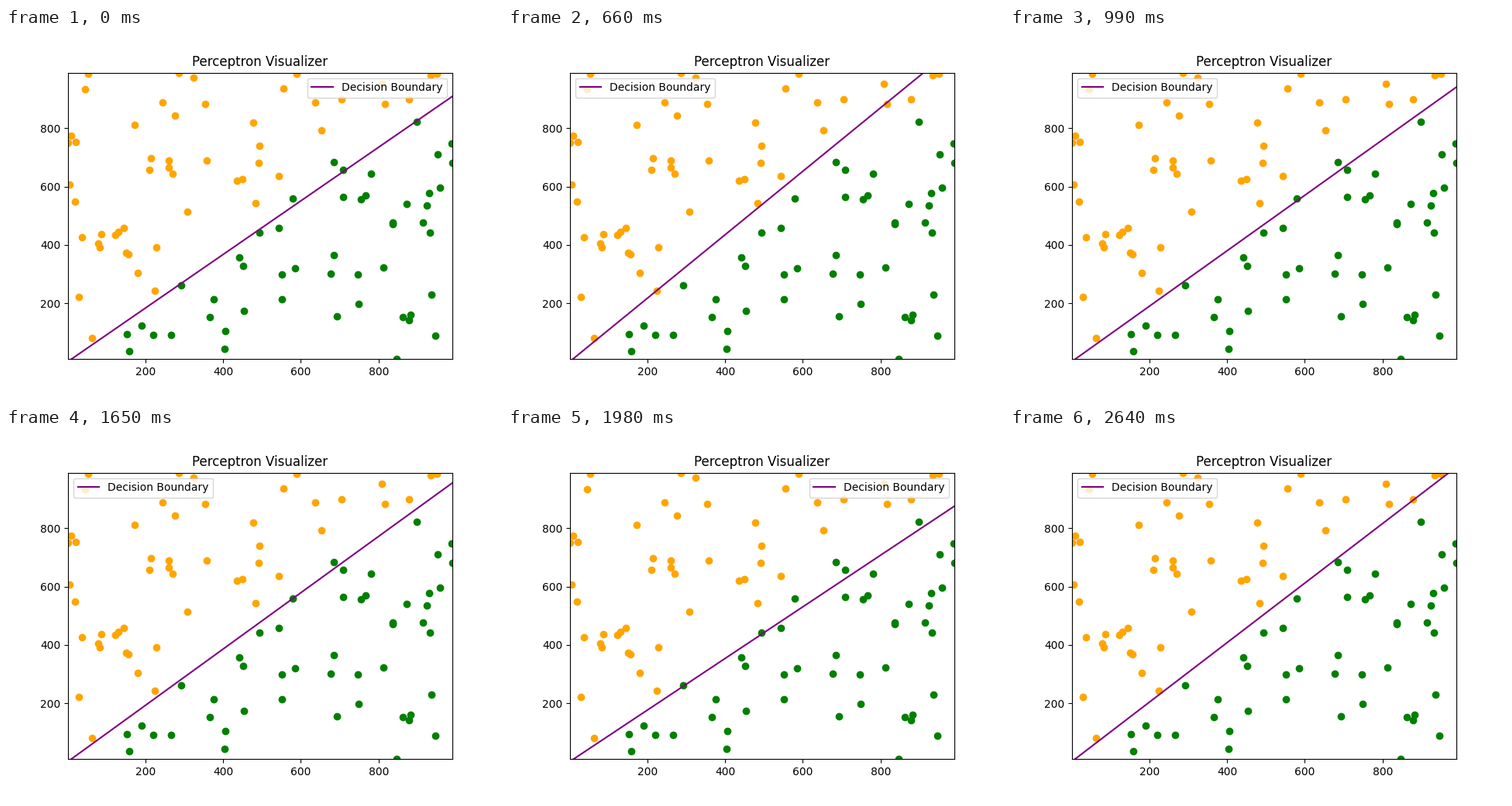
Recreate the animation shown at these times as a matplotlib script. Size 640 px wide and 480 px high, loop 2.97 s.

```python
import numpy as np
import matplotlib.pyplot as plt
from matplotlib.animation import FuncAnimation

INTERVAL = 330
# Slope of the decision boundary after each training step.
SLOPES = [0.918, 0.88, 1.087, 0.95, 1.085, 0.9645, 0.884, 1.05, 1.0195]
# Steeper lines run through the upper right corner, so the legend moves away.
LEGEND_SWITCH = 0.928

ABOVE = [
    (53, 986), (45, 933), (286, 989), (324, 973), (245, 889), (276, 843),
    (353, 882), (173, 810), (8, 774), (1, 750), (21, 754), (5, 607),
    (19, 548), (37, 426), (78, 404), (83, 392), (87, 436), (123, 434),
    (131, 445), (145, 458), (150, 373), (156, 369), (181, 303), (229, 393),
    (224, 243), (29, 222), (63, 80), (211, 656), (215, 697), (260, 689),
    (261, 664), (271, 644), (309, 514), (357, 688), (477, 820), (493, 739),
    (492, 682), (436, 621), (450, 624), (483, 542), (544, 636), (556, 936),
    (590, 987), (638, 887), (653, 792), (705, 899), (808, 952), (817, 884),
    (879, 900), (935, 981), (950, 986),
]
BELOW = [
    (898, 823), (685, 685), (708, 657), (780, 645), (708, 563), (767, 569),
    (755, 555), (580, 558), (989, 747), (953, 710), (990, 681), (958, 597),
    (931, 577), (924, 535), (872, 540), (914, 476), (932, 442), (836, 478),
    (836, 471), (493, 442), (543, 458), (442, 357), (451, 328), (551, 299),
    (586, 321), (684, 365), (677, 301), (746, 299), (812, 324), (293, 263),
    (375, 214), (366, 153), (454, 173), (551, 214), (692, 156), (749, 197),
    (936, 230), (862, 152), (883, 160), (878, 142), (947, 88), (846, 9),
    (405, 105), (404, 44), (191, 124), (152, 95), (220, 93), (266, 93),
    (158, 36),
]

fig, ax = plt.subplots(figsize=(6.4, 4.8), dpi=100)
ax.set_title("Perceptron Visualizer")
for points, color in ((ABOVE, "orange"), (BELOW, "green")):
    ax.scatter(*zip(*points), color=color)

xs = np.array([0, 1000])
boundary, = ax.plot(xs, SLOPES[0] * xs, color="purple", label="Decision Boundary")
ax.set_xlim(1, 990)
ax.set_ylim(9, 990)
legend = ax.legend(loc="upper right")


def update(step):
    slope = SLOPES[step]
    boundary.set_ydata(slope * xs)
    legend.set_loc("upper left" if slope > LEGEND_SWITCH else "upper right")
    return boundary, legend


anim = FuncAnimation(fig, update, frames=len(SLOPES), interval=INTERVAL,
                     repeat=True, repeat_delay=0)
plt.show()
```
